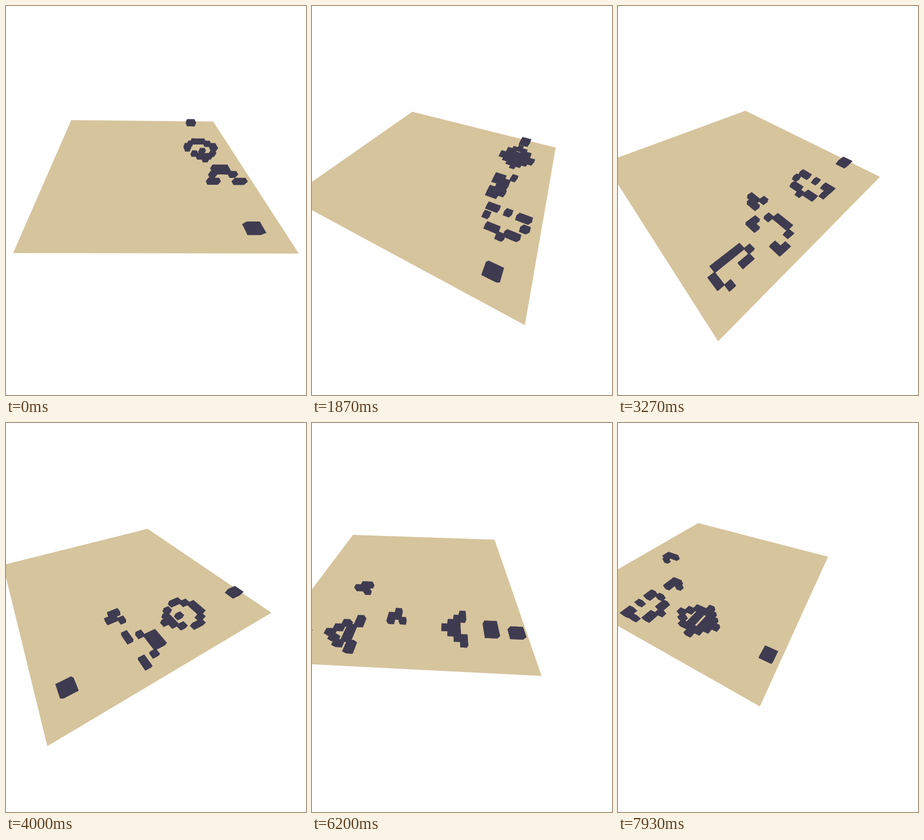
An HTML page with a canvas that plays this animation: 612 by 792 pixels, repeating every 8000 ms.

```html
<!DOCTYPE html>
<html lang="en">
<head>
<meta charset="utf-8">
<title>Glider gun on a turning board</title>
<style>
  html, body { margin: 0; width: 100%; height: 100%; overflow: hidden; background: #fff; }
  canvas { display: block; }
</style>
</head>
<body>
<canvas id="stage" width="612" height="792"></canvas>
<script>
const ctx = document.getElementById('stage').getContext('2d');
const SAND = '#d6c49d', INK = '#3f3c51';
const LOOP = 8000, FRAMES = 120, SIZE = 40;

// Gosper glider gun, one string per row
const GUN = [
  '........................O',
  '......................O.O',
  '............OO......OO............OO',
  '...........O...O....OO............OO',
  'OO........O.....O...OO',
  'OO........O...O.OO....O.O',
  '..........O.....O.......O',
  '...........O...O',
  '............OO'
];
const GUN_COL = 1, GUN_ROW = 2;

function firstGeneration() {
  const cells = new Uint8Array(SIZE * SIZE);
  GUN.forEach((line, r) => [...line].forEach((ch, c) => {
    if (ch === 'O') cells[(r + GUN_ROW) * SIZE + c + GUN_COL] = 1;
  }));
  return cells;
}

function nextGeneration(cells) {
  const alive = (c, r) => c >= 0 && r >= 0 && c < SIZE && r < SIZE ? cells[r * SIZE + c] : 0;
  return cells.map((self, i) => {
    const c = i % SIZE, r = Math.floor(i / SIZE);
    let n = -self;
    for (let dr = -1; dr <= 1; dr++)
      for (let dc = -1; dc <= 1; dc++) n += alive(c + dc, r + dr);
    return n === 3 || (n === 2 && self) ? 1 : 0;
  });
}

const generations = [firstGeneration()];
while (generations.length < FRAMES / 2) generations.push(nextGeneration(generations.at(-1)));

// Camera: horizon point, roll, focal scale, ground point below the camera
const HORIZON = { x: 259, y: -32 }, ROLL = 0.018, FOCAL = 575, FOOT = 0.96;
const PIVOT = { col: 16, row: 24, u: -0.01, w: 1.729 };
const CELL = 0.0273, TOP = 1.051, START_ANGLE = 91;

function makeProjector(degrees) {
  const cos = Math.cos(degrees * Math.PI / 180), sin = Math.sin(degrees * Math.PI / 180);
  return (col, row, lift) => {
    const along = (PIVOT.col - col) * CELL, across = (row - PIVOT.row) * CELL;
    const u = (PIVOT.u + along * cos - across * sin) * lift;
    const w = FOOT + (PIVOT.w + along * sin + across * cos - FOOT) * lift;
    const b = FOCAL / w, a = u * b;
    return [HORIZON.x + a - ROLL * b, HORIZON.y + b + ROLL * a];
  };
}

function polygon(points) {
  ctx.beginPath();
  points.forEach(([x, y]) => ctx.lineTo(x, y));
  ctx.closePath();
  ctx.fill();
}

function drawCube(project, c, r) {
  const corners = [[c, r], [c + 1, r], [c + 1, r + 1], [c, r + 1]];
  const base = corners.map(([x, y]) => project(x, y, 1));
  const top = corners.map(([x, y]) => project(x, y, TOP));
  polygon(base);
  for (let i = 0; i < 4; i++) {
    const j = (i + 1) % 4;
    polygon([base[i], base[j], top[j], top[i]]);
  }
  polygon(top);
  ctx.stroke();
}

function draw(frame) {
  const project = makeProjector(START_ANGLE - frame);
  ctx.fillStyle = '#fff';
  ctx.fillRect(0, 0, 612, 792);
  ctx.fillStyle = SAND;
  polygon([[0, 0], [SIZE, 0], [SIZE, SIZE], [0, SIZE]].map(([c, r]) => project(c, r, 1)));
  ctx.fillStyle = ctx.strokeStyle = INK;
  ctx.lineWidth = 0.6;
  generations[Math.floor(frame / 2)].forEach((on, i) => {
    if (on) drawCube(project, i % SIZE, Math.floor(i / SIZE));
  });
}

const start = performance.now();
function tick() {
  const t = (performance.now() - start) % LOOP;
  draw(Math.floor((t + 5) * FRAMES / LOOP) % FRAMES);
  requestAnimationFrame(tick);
}
tick();
</script>
</body>
</html>
```
